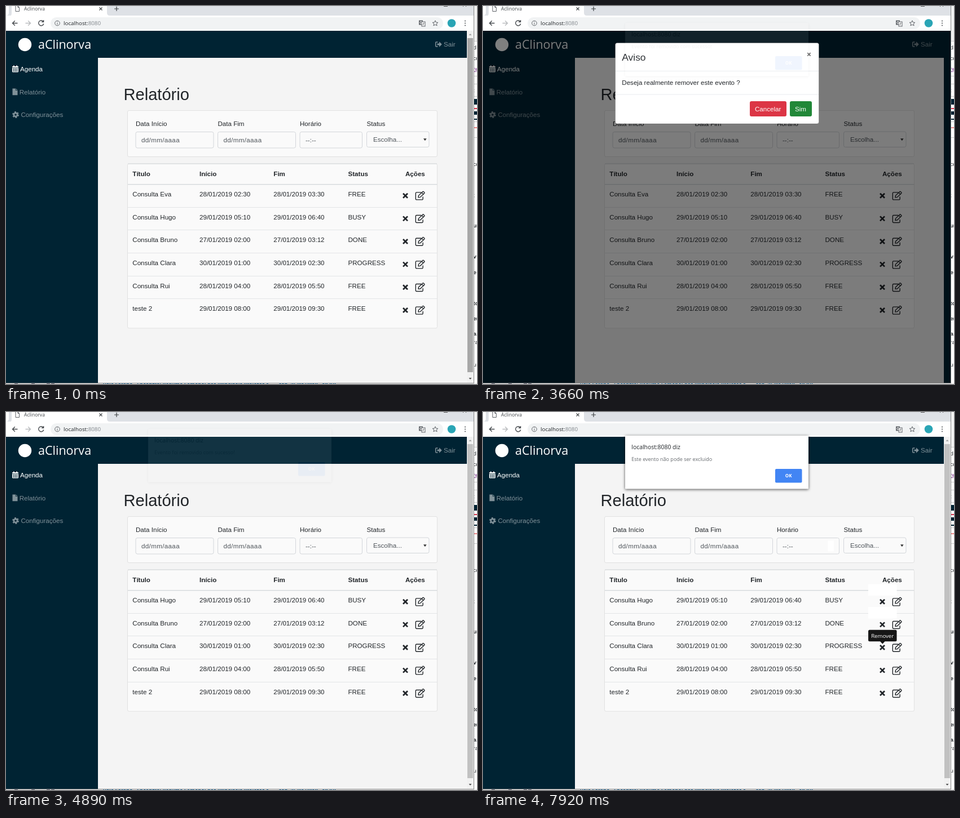
These frames come from a looping animation (835 px wide and 671 px high, 8 s). An HTML page:

```html
<!DOCTYPE html>
<html lang="pt-BR">
<head>
<meta charset="utf-8">
<title>Relatório</title>
<style>
html, body { margin: 0; width: 100%; height: 100%; overflow: hidden; background: #fff; }
svg { display: block; font: 11.6px "Liberation Sans", Arial, sans-serif; fill: #212529; }
.ui { font-family: "Open Sans", sans-serif; }
.bold { font-weight: bold; }
.line { fill: none; stroke: #212529; }
.field { fill: #fafafa; stroke: #d3d6da; }
.card { fill: #fafafa; stroke: #e1e1e1; }
</style>
</head>
<body>
<svg id="stage" width="835" height="671" viewBox="0 0 835 671" xmlns="http://www.w3.org/2000/svg"></svg>
<script>
const NAVY = '#002333', MUTED = '#809199';
const PITCH = 40.65;
const LOOP = 8000, TICK = 30;

const rect = (x, y, w, h, fill, more = '') =>
  `<rect x="${x}" y="${y}" width="${w}" height="${h}" ${fill ? `fill="${fill}"` : ''} ${more}/>`;
const text = (x, y, content, more = '') => `<text x="${x}" y="${y}" ${more}>${content}</text>`;
const path = (d, more = '') => `<path d="${d}" class="line" ${more}/>`;
const group = (id, content, more = '') => `<g id="${id}" ${more}>${content}</g>`;

function desktop() {
  const scraps = [
    [77, 'd'], [96, 'cq'], [153, ':'], [284, 'co'], [339, ';'], [393, 'u', 1], [448, 'v', 1],
    [476, 'e', 1], [531, 'to', 1], [558, 'er', 1], [585, 'a', 1], [600, 'ra'], [640, 'u']
  ];
  const bars = [[165, 10, NAVY], [181, 2, '#d9364f'], [187, 6, NAVY], [200, 2, NAVY], [215, 2, '#f08a8a']];
  return rect(0, 0, 835, 671, '#fff') + rect(829, 0, 6, 62, '#f2f2f2') +
    [62, 124, 138, 160, 205, 233].map(y => rect(829, y, 6, 1, '#ccc')).join('') +
    scraps.map(([y, s, bold]) => text(828.5, y, s, `font-size="9.5" ${bold ? 'class="bold"' : ''}`)).join('') +
    text(828, 115, 'ng', 'font-size="9.5" fill="#7a2a8a" text-decoration="underline"') +
    bars.map(([y, h, c]) => rect(829, y, 6, h, c)).join('') +
    rect(0, 669, 835, 2, '#f1f1f1') +
    text(172, 675, 'Vale Sereno - Encontro: Resumo Semanal dos Principais Projetos e ... - sáb, 26/01/2019 - 10 KB',
      'font-size="9" class="ui bold" fill="#1d6fa8"') +
    [15, 45, 72, 80].map(x => rect(x, 669, 6, 2, '#667')).join('') +
    rect(0, 669, 830, 1, '#888') + rect(829, 0, 1, 670, '#888');
}

function browser() {
  return rect(0, 0, 829, 18, '#dee1e6') +
    '<path d="M0 0H5V12Q5 17 0 17ZM8 17Q10 17 10 12V0H179V12Q179 17 184 17Z" fill="#fff"/>' +
    rect(0, 17, 829, 27, '#fff') +
    path('M17 0V9.5H23.5V2.5L21 0M21 0V2.5H23.5', 'style="stroke:#5f6368"') +
    text(32, 8, 'Aclinorva', 'class="ui" font-size="8.6" fill="#45494d"') +
    path('M165.5 2.5l5 5m0-5l-5 5M192 5h8m-4-4v8', 'style="stroke:#3c4043" stroke-width="1.2"') +
    path('M776 .3h7M810 0l1 .8M816 0l-1 .8', 'style="stroke:#333"') +
    path('M20.5 30.5h-9m4.3-4.3l-4.3 4.3 4.3 4.3', 'style="stroke:#45494d" stroke-width="1.4"') +
    path('M34.5 30.5h9m-4.3-4.3l4.3 4.3-4.3 4.3', 'style="stroke:#b9bbbe" stroke-width="1.4"') +
    path('M66 27.5a4.6 4.6 0 1 0 .8 4M66.6 25v3.4h-3.6', 'style="stroke:#45494d" stroke-width="1.4"') +
    rect(79, 20, 696, 21, '#f1f3f4', 'rx="10.5"') +
    '<circle cx="91" cy="30.5" r="4.3" class="line" style="stroke:#5f6368"/>' +
    path('M91 30v3M91 27.7v1.2', 'style="stroke:#5f6368"') +
    text(102, 34, 'localhost:<tspan fill="#80868b">8080</tspan>', 'class="ui" font-size="9.8"') +
    rect(732, 25.5, 7, 8, '#5f6368') + rect(737, 28, 6, 8, '#fff', 'stroke="#5f6368"') +
    text(733.2, 32.3, 'G', 'font-size="6.5" class="bold" fill="#fff"') +
    path('M738.5 30.5h3.5m-1.7 0q0 2-2 3.5m.6-2l2.4 2', 'style="stroke:#5f6368" stroke-width=".7"') +
    path('M761 25.8l1.4 3.2 3.5.3-2.7 2.2.9 3.4-3.1-1.8-3.1 1.8.9-3.4-2.7-2.2 3.5-.3z', 'style="stroke:#5f6368"') +
    '<circle cx="790" cy="30.5" r="7.3" fill="#2aa5b5"/>' +
    [26.5, 30.5, 34.5].map(y => `<circle cx="814" cy="${y}" r="1.1" fill="#5f6368"/>`).join('');
}

function navigation() {
  let calendar = rect(11, 107, 11, 10.5, '#fff', 'rx="1"') + rect(13, 105.5, 1.7, 3, '#fff') +
    rect(18.3, 105.5, 1.7, 3, '#fff') + rect(11, 109.2, 11, .8, NAVY);
  for (let i = 0; i < 6; i++)
    calendar += rect(12.5 + i % 3 * 3, 111.2 + (i > 2) * 3, 2, 1.9, NAVY);
  return rect(0, 44, 829, 48, NAVY) + rect(0, 92, 163, 577, NAVY) + rect(817, 92, 12, 577, NAVY) +
    '<circle cx="33.5" cy="68.5" r="11.7" fill="#fff"/>' +
    text(57, 76, 'aClinorva', 'class="ui" font-size="21.5" fill="#fff"') +
    path('M765.5 64H762.7Q761.7 64 761.7 65V71Q761.7 72 762.7 72H765.5', `style="stroke:${MUTED}" stroke-width="1.5"`) +
    `<path d="M764.5 66.5H768V63.3L772.8 68 768 72.7V69.5H764.5Z" fill="${MUTED}"/>` +
    text(776, 72, 'Sair', `fill="${MUTED}"`) +
    calendar + text(25, 116, 'Agenda', 'fill="#fff"') +
    `<path d="M11.5 146.5H17V150H20.5V158.2H11.5ZM17.8 146.5L20.5 149.2H17.8Z" fill="${MUTED}"/>` +
    text(23.7, 157, 'Relatório', `fill="${MUTED}"`) +
    `<g fill="none" stroke="${MUTED}"><circle cx="17" cy="193" r="3.1" stroke-width="2.6"/>
     <circle cx="17" cy="193" r="4.9" stroke-width="2" stroke-dasharray="2.8 2.33"/></g>` +
    text(26.5, 197, 'Configurações', `fill="${MUTED}"`);
}

function filters() {
  const columns = [
    [230, 138, 'Data Início', 'dd/mm/aaaa'], [375.5, 138, 'Data Fim', 'dd/mm/aaaa'],
    [521, 110.5, 'Horário', '--:--'], [639.5, 110.5, 'Status', 'Escolha...']
  ];
  return rect(163, 92, 654, 577, '#f4f4f4') +
    text(208.5, 166.5, 'Relatório', 'font-size="29.1"') +
    rect(215.5, 185.5, 549, 82, '', 'class="card" rx="2.5"') +
    columns.map(([x, w, label, value], i) =>
      text(x, 212.5, label) +
      rect(x, i < 3 ? 223.5 : 223, w, i < 3 ? 28.5 : 27.5, '', 'class="field" rx="3"') +
      text(x + (i < 3 ? 10 : 11.5), i < 3 ? 242 : 241, value,
        `fill="#50565c" ${i < 2 ? 'letter-spacing=".35"' : ''}`)).join('') +
    '<path d="M740 235.3h5.6l-2.8 4z" fill="#333"/>';
}

const EVENTS = [
  ['Consulta Eva', '28/01/2019 02:30', '28/01/2019 03:30', 'FREE'],
  ['Consulta Hugo', '29/01/2019 05:10', '29/01/2019 06:40', 'BUSY'],
  ['Consulta Bruno', '27/01/2019 02:00', '27/01/2019 03:12', 'DONE'],
  ['Consulta Clara', '30/01/2019 01:00', '30/01/2019 02:30', 'PROGRESS'],
  ['Consulta Rui', '28/01/2019 04:00', '28/01/2019 05:50', 'FREE'],
  ['teste 2', '29/01/2019 08:00', '29/01/2019 09:30', 'FREE']
];
const COLUMN_X = [224.3, 343, 474.3, 606.5, 708];

function table(events) {
  const cells = (values, y, more) => values.map((v, i) => text(COLUMN_X[i], y, v, more)).join('');
  const actions = y =>
    path('M-4 -4L4 4M4 -4L-4 4', `transform="translate(708 ${y})" stroke-width="2.7"`) +
    path('M2-5.8H-6.2a1.5 1.5 0 0 0-1.5 1.5V5.7a1.5 1.5 0 0 0 1.5 1.5H3.6a1.5 1.5 0 0 0 1.5-1.5V1.8' +
      'M-3 3l.4-3.1L4.8-7.2Q5.5-7.8 6.2-7.2L7.7-5.7Q8.3-5 7.7-4.3L.3 2.7ZM3-5.5L6-2.5',
      `transform="translate(734 ${y})" stroke-width="1.4"`);
  return rect(215.5, 280, 549, 48 + PITCH * events.length, '', 'class="card" rx="2.5"') +
    rect(216, 279.5, 548, 1, '#d5d9dc') +
    cells(['Título', 'Início', 'Fim', 'Status', 'Ações'], 302, 'class="bold"') +
    events.map((event, i) =>
      rect(216, Math.round(316 + PITCH * i), 548, i ? 1 : 1.4, i ? '#e3e5e7' : '#d5d9dc') +
      cells(event, Math.round(338 + PITCH * i)) + actions(336.7 + PITCH * i)).join('');
}

function modal() {
  return rect(0, 44, 829, 625, '#000', 'opacity=".5"') +
    rect(234.5, 65.5, 361, 143.5, '#fff', 'rx="3.5" stroke="#000" stroke-opacity=".2"') +
    rect(235, 115, 360, 1, '#e9ecef') + rect(235, 156.5, 360, 1, '#e9ecef') +
    text(246.3, 97, 'Aviso', 'font-size="17.4"') +
    path('M575.2 83.2l5.4 5.4m0-5.4l-5.4 5.4', 'style="stroke:#707070" stroke-width="1.8"') +
    text(246.3, 140, 'Deseja realmente remover este evento ?') +
    rect(473, 169, 65, 27, '', 'rx="3" id="cancel"') + text(482, 187, 'Cancelar', 'fill="#fff"') +
    rect(544, 169, 39, 27, '', 'rx="3" id="confirm"') + text(553, 187, 'Sim', 'fill="#fff"');
}

function alertBox() {
  return rect(252, 42, 325, 94.5, '#fff', 'rx="1" style="filter:drop-shadow(0 1px 2.5px rgba(0,0,0,.7))"') +
    text(263.3, 66, 'localhost:8080 diz', 'class="ui" font-size="10.4"') +
    text(263.3, 86.5, '', 'class="ui" font-size="9" fill="#666a6e" id="message"') +
    rect(518, 101, 47.5, 24.5, '', 'rx="2" id="ok"') +
    '<clipPath id="button"><rect x="518" y="101" width="47.5" height="24.5" rx="2"/></clipPath>' +
    '<g clip-path="url(#button)"><circle id="ripple" cx="540" cy="115" fill="#fff" opacity=".1"/></g>' +
    text(541.7, 116, 'OK', 'class="ui bold" font-size="8" fill="#fff" text-anchor="middle"');
}

const tooltip = '<path d="M685.5 305.5H731a2.5 2.5 0 0 1 2.5 2.5V323.5a2.5 2.5 0 0 1-2.5 2.5H712.5L708.3 330.5 704 326H685.5' +
  'a2.5 2.5 0 0 1-2.5-2.5V308a2.5 2.5 0 0 1 2.5-2.5Z" fill="#161616"/>' +
  text(688.2, 320, 'Remover', 'class="ui" font-size="9.6" fill="#fff"');

document.getElementById('stage').innerHTML =
  desktop() + browser() + navigation() + filters() +
  group('before', table(EVENTS)) + group('after', table(EVENTS.slice(1))) +
  group('spinner', '<path d="M614 236l3-4 3 4ZM614 239l3 4 3-4Z" fill="#555"/>') +
  group('timePatch', rect(611.5, 228, 10.5, 19.5, '#fff')) +
  group('patch0', rect(683, 305.5, 50.5, 20.5, '#fff')) +
  group('patch1', rect(683, 305.5 + PITCH, 50.5, 20.5, '#fff')) +
  group('scrollbar', rect(817, 44, 12, 625, '#f1f1f1') +
    rect(818, 57, 10, 593, '', 'id="thumb"') +
    '<path d="M820.5 52l2.5-3 2.5 3Z" fill="#a3a3a3"/><path d="M820.5 660l2.5 3 2.5-3Z" fill="#505050"/>') +
  group('tooltip', tooltip) + group('modal', modal()) + group('alert', alertBox());

const el = Object.fromEntries([...document.querySelectorAll('[id]')].map(node => [node.id, node]));
const show = (node, visible) => node.setAttribute('display', visible ? 'inline' : 'none');
const clamp = v => Math.max(0, Math.min(1, v));

function tooltipRow(t) {
  if (t >= 810 && t < 1860 || t >= 6030 && t < 6930) return 0;
  if (t >= 7020 && t < 7110) return 1;
  return t >= 7170 ? 2 : -1;
}

// How far the alert is open, 0 to 1, or -1 while it is absent.
function alertProgress(t) {
  if (t >= 7770) return clamp((t - 7770) / 150);
  if (t < 3660 || t >= 5520) return -1;
  return t < 4740 ? clamp((t - 3660) / 150) : clamp((4890 - t) / 150);
}

function draw(now) {
  const t = Math.floor(now % LOOP / TICK) * TICK;
  const removed = t >= 4860, modalOpen = t >= 1860 && !removed;

  show(el.before, !removed);
  show(el.after, removed);
  show(el.modal, modalOpen);
  show(el.scrollbar, !modalOpen);
  show(el.spinner, t >= 5520 && t < 5580);
  show(el.timePatch, t >= 5580);
  show(el.patch0, t >= 6930);
  show(el.patch1, t >= 7110);
  el.thumb.setAttribute('fill', t < 300 ? '#a8a8a8' : t < 330 ? '#b5b5b5' : '#c1c1c1');
  el.cancel.setAttribute('fill', t >= 2550 && t < 3180 ? '#c82333' : '#dc3545');
  el.confirm.setAttribute('fill', t < 3210 ? '#28a745' : t >= 3540 && t < 3600 ? '#1e7e34' : '#218838');

  const row = tooltipRow(t);
  show(el.tooltip, row >= 0);
  el.tooltip.setAttribute('transform', `translate(0 ${row * PITCH})`);

  const open = alertProgress(t);
  const pressed = t >= 4650 && t < 5520;
  show(el.alert, open >= 0);
  el.alert.setAttribute('opacity', .07 + .93 * open);
  el.alert.setAttribute('transform', `translate(0 ${-12 * (1 - open) ** 2})`);
  el.message.textContent = t < 6000 ? 'Evento foi removido com sucesso!' : 'Este evento não pode ser excluido';
  el.ok.setAttribute('fill', pressed ? '#4c8bf5' : '#4285f4');
  el.ripple.setAttribute('r', pressed ? 3 + (t - 4650) / 10 : 0);
}

function frame() {
  draw(performance.now());
  requestAnimationFrame(frame);
}
frame();
</script>
</body>
</html>
```
